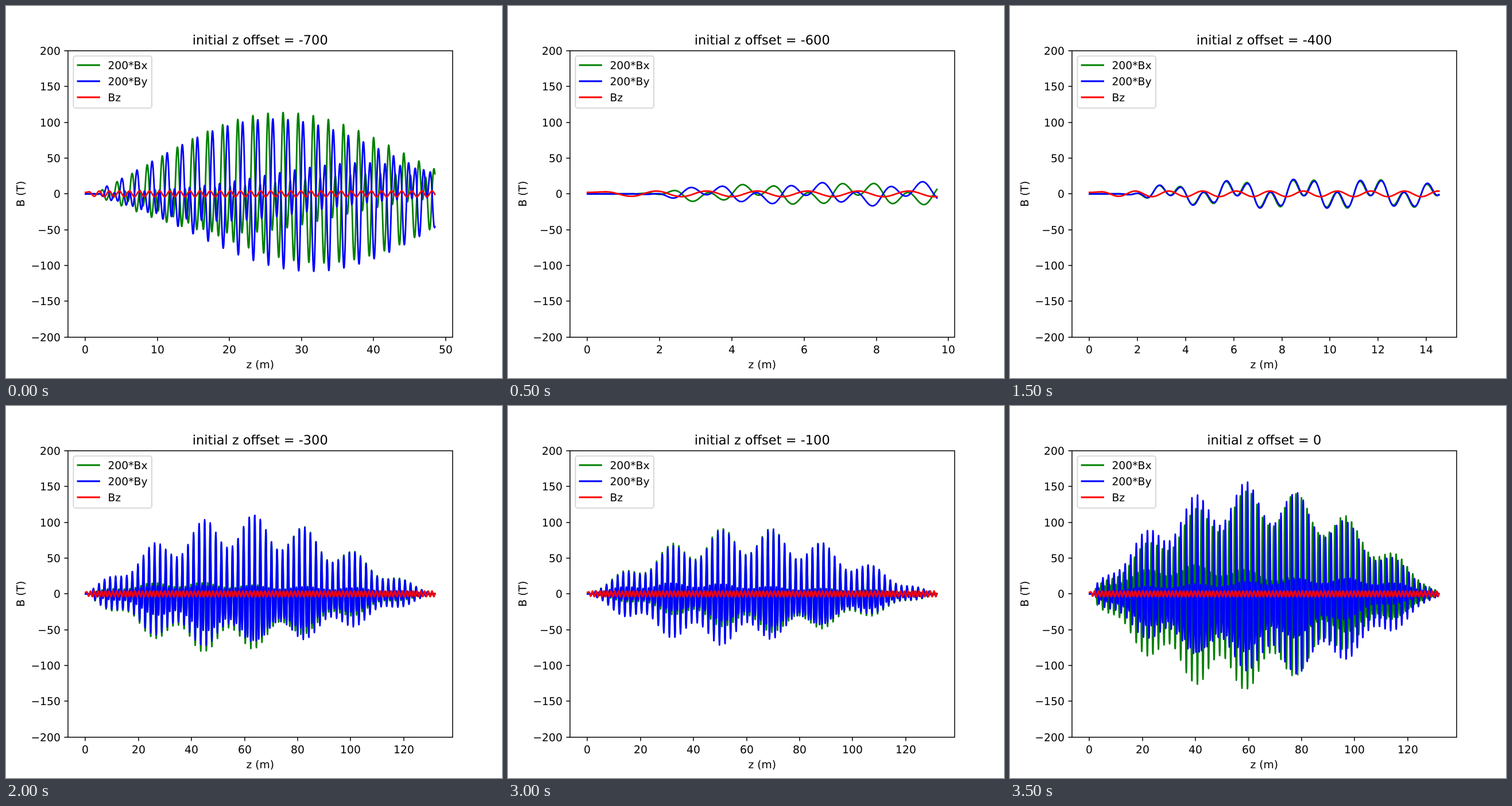
An HTML page for the animation above (4000 ms loop, 864x648 px).

```html
<!DOCTYPE html>
<html lang="en">
<head>
<meta charset="utf-8">
<title>Field along z</title>
<style>
html, body { margin: 0; width: 100%; height: 100%; overflow: hidden; background: #fff; }
svg { display: block; width: 864px; height: 648px; }
text { font: 18.75px "DejaVu Sans", sans-serif; fill: #000; text-rendering: geometricPrecision; }
.title { font-size: 22.5px; }
.mid { text-anchor: middle; }
.end { text-anchor: end; }
.curve { fill: none; stroke-width: 2.8; stroke-linejoin: round; stroke-linecap: square; }
.axis { fill: none; stroke: #000; stroke-width: 1.5; }
.plot { display: none; }
.plot.on { display: inline; }
</style>
</head>
<body>
<svg viewBox="0 0 864 648"></svg>
<script>
const BOX = { l: 108, r: 778, t: 78, b: 577 };
const X0 = 138.44, X1 = 747.16, Y0 = 327.24, UNIT = 1.2474;
const GREEN = '#008000', BLUE = '#0000ff', RED = '#ff0000';
const TAU = 2 * Math.PI, STEP = 500;
const COIL = 1.4;    // period of Bz in metres
const RIPPLE = 19.2; // period of the slow swelling in metres
const svg = document.querySelector('svg');

function add(parent, tag, attrs, text) {
  const el = document.createElementNS('http://www.w3.org/2000/svg', tag);
  for (const k in attrs) el.setAttribute(k, attrs[k]);
  if (text !== undefined) el.textContent = text;
  return parent.appendChild(el);
}
const label = (g, x, y, text, cls = '') => add(g, 'text', { x, y, class: cls }, text);
const toY = v => Y0 - v * UNIT;

function line(g, d, stroke) {
  add(g, 'path', { d, stroke, class: 'curve' });
}

function graph(g, field, end, color) {
  let d = '';
  for (let x = X0; x <= X1; x += 0.35) {
    const z = (x - X0) / (X1 - X0) * end;
    d += `${d ? 'L' : 'M'}${x.toFixed(2)} ${toY(field(z)).toFixed(2)}`;
  }
  line(g, d, color);
}

const coilPhase = z => TAU * (z - 0.5) / COIL;

function axial(z) {
  if (z < 0.5) return 2.4 - 0.4 * Math.cos(TAU * z);
  return (2.8 + Math.min(1.1, (z - 0.5) * 0.8)) * Math.cos(coilPhase(z));
}

// Strength of the transverse field: a skewed hump, a ripple and a soft start
function envelope(z, { span, height, skew = 0.85, power = 1, depth = 0, crest = 0 }) {
  const hump = Math.sin(Math.PI * Math.min(1, z / span) ** skew);
  const ripple = 1 - depth * (0.5 - 0.5 * Math.cos(TAU * (z - crest) / RIPPLE));
  const t = Math.min(1, Math.max(0, (z - 1.2) / 1.6));
  return height * Math.max(0, hump) ** power * ripple * t * t * (3 - 2 * t);
}

// A slow tone that crests at `peak`, and its mirror about the coil frequency
const transverse = (p, peak) => z => {
  const slow = TAU * p.rate * (z - peak);
  const tones = 0.45 * Math.cos(slow) - 0.55 * Math.cos(2 * coilPhase(z) - slow);
  return envelope(z, p) * tones;
};

const short = { gap: 2, rate: 0.345, span: 18, height: 18 };
const long = { end: 131.8, gap: 20, rate: 0.475, span: 132.5, power: 1.2, depth: 0.42 };

const plots = [
  { end: 48.5, gap: 10, rate: 0.472, span: 58, height: 118, skew: 1, power: 1.3, x: 16.95, y: 17.74 },
  { ...short, end: 9.68, x: 4.6, y: 3.3 },
  { ...short, end: 9.74, x: 4.6, y: 3.3 },
  { ...short, end: 14.53, rate: 0.35, span: 22, height: 24, x: 8.9, y: 11.7 },
  { ...long, height: 112, crest: 44.5, x: 63.8, y: 44.9 },
  { ...long, height: 84, crest: 48, x: 57.5, y: 47 },
  { ...long, height: 95, crest: 50.5, x: 51.2, y: 49.05 },
  { ...long, height: 158, skew: 0.9, power: 1, depth: 0.36, crest: 59, x: 58.8, y: 61.8 }
];

const groups = plots.map((p, i) => {
  const g = add(svg, 'g', { class: 'plot' });
  label(g, 442.8, 67, `initial z offset = ${(i - 7) * 100}`, 'title mid');
  for (let z = 0; z <= p.end * 1.05; z += p.gap) {
    const x = Math.round(X0 + z / p.end * (X1 - X0));
    add(g, 'path', { d: `M${x} ${BOX.b}v6.56`, class: 'axis' });
    label(g, x, 604.5, z, 'mid');
  }
  graph(g, transverse(p, p.x), p.end, GREEN);
  graph(g, transverse(p, p.y), p.end, BLUE);
  graph(g, axial, p.end, RED);
  return g;
});

add(svg, 'rect', { x: BOX.l, y: BOX.t, width: BOX.r - BOX.l, height: BOX.b - BOX.t, class: 'axis' });
for (let v = -200; v <= 200; v += 50) {
  const y = Math.round(toY(v));
  add(svg, 'path', { d: `M${BOX.l} ${y}h-6.56`, class: 'axis' });
  label(svg, 94.9, y + 7, String(v).replace('-', '\u2212'), 'end');
}
label(svg, 442.8, 630.5, 'z (m)', 'mid');
add(svg, 'text', { transform: `translate(32 ${Y0}) rotate(-90)`, class: 'mid' }, 'B (T)');

add(svg, 'rect', {
  x: 117.4, y: 87.1, width: 136.6, height: 90.6, rx: 3.75,
  fill: '#fff', 'fill-opacity': 0.8, stroke: '#ccc', 'stroke-opacity': 0.8, 'stroke-width': 1.9
});
[['200*Bx', GREEN], ['200*By', BLUE], ['Bz', RED]].forEach(([name, color], i) => {
  const y = 103 + i * 28;
  line(svg, `M125 ${y}h37.5`, color);
  label(svg, 177.4, y + 7, name);
});

let shown = -1;
function draw() {
  const now = Math.floor(performance.now() / STEP) % groups.length;
  if (now !== shown) {
    groups.forEach((g, i) => g.classList.toggle('on', i === now));
    shown = now;
  }
  requestAnimationFrame(draw);
}
draw();
</script>
</body>
</html>
```
